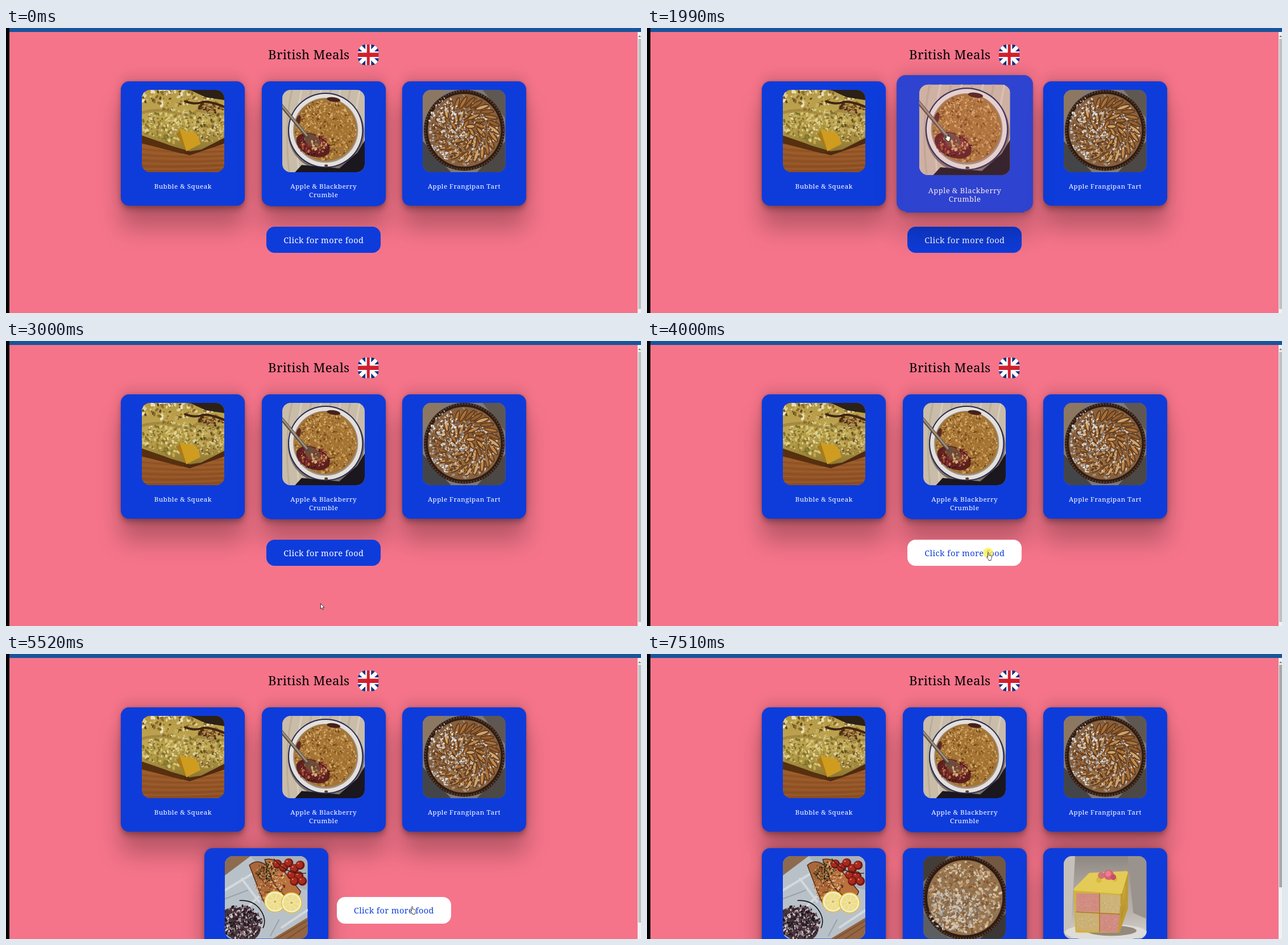
Write an HTML page that moves like this. It is 1117 px wide and 502 px high and loops after 8000 ms.

```html
<!DOCTYPE html>
<html lang="en">
<head>
<meta charset="utf-8">
<title>British Meals</title>
<style>
  html, body { margin: 0; width: 100%; height: 100%; overflow: hidden; }
  #stage {
    position: absolute; left: 0; top: 0; width: 1117px; height: 502px; overflow: hidden;
    background: #f5748a; font-family: "Noto Serif", serif;
  }
  #stage div, #stage svg { position: absolute; }
  #topbar { left: 0; top: 0; width: 1117px; height: 7px; background: #17559b; z-index: 3; }
  #edge { left: 0; top: 0; width: 6px; height: 502px; background: #000; z-index: 3; }
  #scroll { left: 1111px; top: 7px; width: 6px; height: 495px; background: #f1f1f1; z-index: 3; }
  #thumb { left: 1px; top: 12px; width: 5px; }
  #scroll svg { left: 1px; top: 5px; }
  #heading { left: 461px; top: 32px; font-size: 22.3px; line-height: 30px; letter-spacing: .3px; white-space: pre; color: #000; }
  #flag { left: 619px; top: 29px; width: 36.5px; height: 36.5px; border-radius: 14.5px; }
  .card {
    top: 94.4px; width: 218.2px; height: 218.2px; border-radius: 14.5px; background: #0e3cdb;
    box-shadow: rgba(0,0,0,.25) 0 39px 40px, rgba(0,0,0,.12) 0 -8.7px 22px,
      rgba(0,0,0,.12) 0 3px 4.4px, rgba(0,0,0,.17) 0 8.7px 9.5px, rgba(0,0,0,.09) 0 -2px 3.6px;
  }
  .card.low { top: 341.7px; }
  .card.hover { transform: scale(1.1); opacity: .86; z-index: 1; }
  .card svg { left: 36.4px; top: 14.5px; width: 145.4px; height: 145.4px; border-radius: 14.5px; }
  .name {
    left: 14.5px; top: 178px; width: 189.2px; text-align: center; color: #fff; background: #0e3cdb;
    font-size: 11.6px; line-height: 14.2px; letter-spacing: .5px; white-space: pre; padding-bottom: 13.5px;
  }
  #button {
    width: 201px; height: 46.5px; border-radius: 14.5px; text-align: center; white-space: pre;
    font-size: 14.5px; line-height: 46.5px; letter-spacing: .42px;
  }
  #click { width: 18px; height: 18px; border-radius: 50%; background: rgba(255,240,60,.72); z-index: 2; }
  .cursor { z-index: 2; overflow: visible; }
</style>
</head>
<body>
<div id="stage">
  <div id="heading">British Meals</div>
  <svg id="flag" viewBox="0 0 36 36">
    <path d="M0 0h36v36H0z" fill="#13307f"/>
    <path d="M-2-2 38 38M38-2-2 38" stroke="#fff" stroke-width="6.6"/>
    <path d="M0 18h36" stroke="#fff" stroke-width="12"/>
    <path d="M18 0v36" stroke="#fff" stroke-width="10"/>
    <path d="M0 18h36" stroke="#d0202e" stroke-width="7.4"/>
    <path d="M18 0v36" stroke="#d0202e" stroke-width="5"/>
  </svg>
  <div id="button">Click for more food</div>
  <div id="click"></div>
  <svg id="arrow" class="cursor" width="8" height="12">
    <path d="M.4.4v9.4l2.1-1.9 1.5 3.4 1.6-.7-1.5-3.3h2.8z" fill="#fff" stroke="#111" stroke-width=".8"/>
  </svg>
  <svg id="hand" class="cursor" width="10" height="15">
    <path d="M2.6 9V1.6q0-1.1.9-1.1t.9 1.1v3.7l3.9.9q1.3.4 1.2 1.8l-.6 3.6-.8 1.2v1.7H4v-1.4L1.1 10Q.2 8.5.8 8.1t1.8.9z"
      fill="#fff" stroke="#222" stroke-width=".8"/>
  </svg>
  <div id="topbar"></div>
  <div id="edge"></div>
  <div id="scroll">
    <div id="thumb"></div>
    <svg width="5" height="4"><path d="M0 4 2.5 1 5 4z" fill="#777"/></svg>
  </div>
</div>
<script>
const $ = id => document.getElementById(id);
const stage = $('stage');

let seed = 7;
const rnd = () => (seed = (seed * 16807) % 2147483647) / 2147483647;
const pick = list => list[Math.floor(rnd() * list.length)];
const poly = (points, fill, extra = '') => `<polygon points="${points}" fill="${fill}" ${extra}/>`;
const disc = (x, y, r, fill, extra = '') => `<circle cx="${x}" cy="${y}" r="${r}" fill="${fill}" ${extra}/>`;
const oval = (x, y, rx, ry, turn, fill, extra = '') =>
  `<ellipse rx="${rx}" ry="${ry}" transform="translate(${x} ${y}) rotate(${turn})" fill="${fill}" ${extra}/>`;
const line = (d, color, width) =>
  `<path d="${d}" fill="none" stroke="${color}" stroke-width="${width}" stroke-linecap="round"/>`;
const base = fill => `<rect width="145" height="145" fill="${fill}"/>`;
const shade = (id, stops, dir = 'x2="0" y2="1"') => `<defs><linearGradient id="${id}" ${dir}>` +
  stops.map((c, i) => `<stop offset="${i / (stops.length - 1)}" stop-color="${c}"/>`).join('') + '</linearGradient></defs>';
const many = (n, make) => Array.from({ length: n }, (_, i) => make(i)).join('');

// Random flecks spread evenly inside an ellipse.
const scatter = (n, cx, cy, rx, ry, size, colors) => many(n, () => {
  const a = rnd() * 2 * Math.PI, d = Math.sqrt(rnd()), s = size * (.5 + rnd());
  return oval((cx + Math.cos(a) * d * rx).toFixed(1), (cy + Math.sin(a) * d * ry).toFixed(1),
    s.toFixed(1), (s * .6).toFixed(1), Math.round(rnd() * 180), pick(colors));
});

const crust = (x, y, r) => disc(x, y, r, '#2e1d15') +
  disc(x, y, r - 2, 'none', 'stroke="#6b442c" stroke-width="3" stroke-dasharray="2 3"');

function squeak() {
  return shade('wood', ['#6d3a18', '#a2622f', '#8d4f24']) + shade('slab', ['#b59a45', '#c0a654', '#8d762f']) +
    base('url(#wood)') +
    many(14, i => line(`M0 ${84 + i * 5}Q70 ${96 + i * 4} 145 ${92 + i * 4}`, i % 2 ? '#a4652f' : '#84491f', 1)) +
    poly('0,78 0,92 84,115 145,94 145,80', '#4f2a12') +
    poly('0,0 145,0 145,84 104,105 84,108 50,98 0,82', 'url(#slab)') +
    scatter(130, 62, 12, 72, 16, 3, ['#ddd09a', '#8a6b2e', '#c6ae5c', '#5f4a1d', '#eadfb6']) +
    scatter(300, 56, 62, 56, 30, 2.6, ['#d6c678', '#ac983f', '#e0d59c', '#7c7530', '#c3aa4c', '#90772f']) +
    scatter(160, 118, 65, 27, 27, 2.4, ['#c9b364', '#8d6a2c', '#d6c686', '#5f5426', '#a58a3c']) +
    poly('84,0 145,0 145,18 112,13', '#2c2117') +
    scatter(70, 122, 30, 24, 9, 3, ['#6b421c', '#4a2c13', '#946a32', '#b89858']) +
    line('M0 40Q30 32 58 40T98 36Q126 44 145 42', '#6f542150', 5) +
    line('M76 20Q92 26 104 22T145 30', '#3f2611', 4) +
    poly('66,69 96,76 103,95 78,108', '#cf9c20') + poly('66,69 78,108 62,80', '#a87a18') +
    poly('0,80 40,94 76,108 70,112 0,94', '#57300f');
}

function crumble() {
  return base('#c9bca8') +
    many(9, i => line(`M${i * 17} 0Q${i * 17 - 14} 60 ${i * 17 - 5} 145`, i % 2 ? '#bbae99' : '#d6ccbb', 3)) +
    poly('145,88 145,145 22,145 34,132 100,138 132,110', '#1a171f') +
    disc(77, 75, 67, 'rgba(30,22,20,.45)') + disc(76, 71, 66, '#262a58') + disc(76, 71, 64, '#e4e0d9') +
    disc(76, 71, 57, '#9c8f84') + disc(76, 70, 55, '#a47434') +
    scatter(650, 76, 70, 53, 53, 1.7, ['#c8964f', '#8f5f29', '#dcb576', '#744819', '#b98442', '#cda262']) +
    oval(90, 17, 12, 4, 8, '#45201c') + oval(28, 54, 4, 10, 15, '#5d2822') +
    oval(54, 97, 31, 19, 24, '#5b1f20') +
    scatter(130, 54, 97, 29, 17, 2.2, ['#812a29', '#3c1213', '#9d4236', '#b07848', '#692022']) +
    oval(54, 90, 17, 10, 38, '#6d4c39') + scatter(50, 64, 96, 14, 10, 2.2, ['#c99a62', '#a56c3c', '#7d2f2a', '#d8b183']) +
    line('M-2 27 44 82', '#574d43', 6) + line('M-2 26 43 80', '#9c907f', 3) +
    oval(77, 133, 3, 2, 0, '#5e3a24');
}

function apple() {
  const ring = (n, r, length, shift) => many(n, i => {
    const a = i / n * 360 + shift, p = a * Math.PI / 180;
    return oval((77 + Math.cos(p) * r).toFixed(1), (70 + Math.sin(p) * r).toFixed(1), length, 3.2, a + 38,
      pick(['#c28a4c', '#d3a468', '#ad7138', '#95602f']), 'stroke="#5e3819" stroke-width="1.6"');
  });
  return base('#7d7975') + poly('0,0 40,0 0,50', '#8c7862') + poly('0,90 50,145 0,145', '#434549') +
    poly('145,90 145,145 95,145', '#4b4846') + poly('105,0 145,0 145,50', '#5f5852') +
    crust(73, 71, 71) + disc(73, 71, 64, '#87603d') +
    scatter(280, 73, 71, 61, 61, 2.3, ['#bdb7b4', '#8a6240', '#a3917f', '#68452a', '#d0cbc8']) +
    ring(26, 48, 12, 0) + ring(15, 26, 11, 10) + ring(6, 9, 8, 20) +
    scatter(230, 42, 68, 32, 54, 1.9, ['#d4d3d4', '#b5b2b3', '#e4e2e0', '#8b745f']) +
    scatter(170, 82, 84, 46, 44, 1.6, ['#d0cfd0', '#b9aca0', '#6d4a2c']) +
    scatter(40, 64, 106, 30, 14, 3, ['#7a4e29', '#5c3a1f', '#a1713f']);
}

function fish() {
  const fillet = (d, fill) => `<path d="${d}" fill="${fill}" stroke="#4d2b17" stroke-width="1.5"/>`;
  const lemon = (x, y, r) => disc(x, y, r, '#e3bd33') + disc(x, y, r - 1.5, '#f5f0cc') + disc(x, y, r - 4, '#eddd8c') +
    many(8, i => {
      const a = i * Math.PI / 4 + .2;
      return line(`M${x} ${y}l${(Math.cos(a) * (r - 4)).toFixed(1)} ${(Math.sin(a) * (r - 4)).toFixed(1)}`, '#f7efc4', .8);
    }) + disc(x, y, 2, '#c8ae58');
  return base('#b9c1c8') + poly('0,0 45,0 0,34', '#8c6b50') + poly('145,108 145,145 84,145', '#946541') +
    poly('45,0 145,0 145,60 80,40', '#a9b1b8') +
    line('M0 60 50 30M20 110 70 60M100 125 145 95M30 40 60 80', '#d3d9dd', 4) + line('M0 75 40 60M95 112 80 140', '#98a1a9', 2) +
    line('M110 145 145 122M92 145 145 113', '#7d5030', 2) +
    fillet('M43 16Q55 5 70 14L96 50 98 72 86 98Q72 92 62 66Z', '#a9673a') +
    fillet('M70 6Q90 2 100 22L133 62Q130 76 112 74Q92 62 82 40Z', '#b9723e') +
    scatter(240, 79, 48, 27, 38, 1.8, ['#d9a069', '#8b4c25', '#c78450', '#e2bf98', '#5d351c', '#b06c3a']) +
    scatter(100, 74, 27, 20, 18, 1.5, ['#263019', '#44502a', '#191d14', '#6b4526']) +
    [[92, 14], [103, 20], [112, 12], [122, 22], [132, 16], [117, 33], [130, 35], [136, 44], [122, 44]]
      .map(([x, y]) => disc(x, y, 8, '#6f1813') + disc(x - 1, y - 1, 6, '#a92a1e') + disc(x - 3, y - 3, 1.3, '#e58067')).join('') +
    line('M86 5Q110 34 142 30', '#2f2018', 1.4) +
    oval(26, 120, 38, 28, 25, '#45353b') +
    scatter(380, 28, 116, 38, 29, 2, ['#241a20', '#59394c', '#d0c6c9', '#17131a', '#86656f', '#3a1b29', '#a39a9d']) +
    line('M26 78Q50 77 62 94T67 126', '#191519', 1.6) +
    lemon(88, 80, 19) + lemon(117, 82, 18.5);
}

function almond() {
  return base('#6c6a68') + poly('0,0 45,0 0,45', '#433d39') + poly('145,0 145,45 100,0', '#735842') +
    poly('0,100 45,145 0,145', '#5c5f62') + poly('145,100 145,145 100,145', '#3a3736') +
    crust(73, 73, 74) + disc(73, 73, 66, '#94704a') +
    scatter(900, 73, 73, 63, 63, 2.7, ['#c9ad88', '#a98156', '#bca587', '#7f5a38', '#d8c6aa', '#977048', '#8c7a68']) +
    scatter(260, 54, 94, 46, 38, 2.2, ['#c5c0ba', '#a9a29b', '#d3c6b5', '#7e6a57']);
}

function cake() {
  const crumbs = (x, y, colors) => scatter(90, x, y, 18, 14, 1, colors);
  const pink = ['#dc9a90', '#c58078', '#d59288'], cream = ['#d9c38d', '#c4a96f', '#cfb67c'];
  const round = color => `stroke="${color}" stroke-width="5" stroke-linejoin="round"`;
  return shade('wall', ['#8f8882', '#aaa39d', '#b9b2ab', '#d6d2cd']) +
    shade('side', ['#d9b739', '#c09c30', '#a8842b']) + base('url(#wall)') +
    poly('0,0 20,0 12,145 0,145', '#c6c0ba') + poly('112,0 145,0 145,110 122,100', '#9a938d') +
    oval(74, 134, 72, 15, 0, '#dedcd8') + oval(84, 131, 44, 9, 0, '#94897f') +
    poly('20,60 46,32 110,29 110,92 96,132 23,132', '#d2b23b', round('#d2b23b')) +
    poly('101,66 111,30 110,92 96,132', 'url(#side)', round('#be9b32')) +
    poly('20,58 46,32 110,29 100,64', '#e4cb57', round('#e4cb57')) +
    poly('22,65 63,66 62,98 22,97', '#d18c82') + poly('64,66 100,69 98,101 64,99', '#ccb379') +
    poly('22,99 62,100 62,132 23,130', '#cbb076') + poly('64,101 98,103 95,134 64,133', '#d18c82') +
    crumbs(42, 81, pink) + crumbs(82, 84, cream) + crumbs(42, 115, cream) + crumbs(80, 118, pink) +
    line('M22 98 98 102M63 66V133', '#a97436', 1.5) +
    disc(62, 42, 5, '#dcb93a') + disc(90, 41, 4, '#dcb93a') +
    disc(66, 34, 6, '#cf727b') + disc(79, 33, 9, '#d76376') + disc(78, 31, 5, '#e88092') + disc(87, 37, 5, '#c55068');
}

const meals = [
  [squeak, 'Bubble & Squeak'], [crumble, 'Apple & Blackberry\nCrumble'], [apple, 'Apple Frangipan Tart'],
  [fish], [almond], [cake]
];
const cards = meals.map(([photo, name], i) => {
  const el = document.createElement('div');
  el.className = i < 3 ? 'card' : 'card low';
  el.innerHTML = `<svg viewBox="0 0 145 145">${photo()}</svg>`;
  if (name) {
    const label = document.createElement('div');
    label.className = 'name';
    label.textContent = name;
    el.append(label);
  }
  stage.insertBefore(el, $('button'));
  return el;
});

const CENTER = 558.75, CELL = 247.3, GAP = 14.5, BUTTON = 201;

// start ms, pointer, x, y, cards shown, hovered card, button highlight, click mark
const steps = [
  [0, '', 0, 0, 3],
  [500, 'arrow', 1070, 494, 3],
  [990, 'arrow', 1029, 260, 3],
  [1490, 'hand', 790, 215, 3, 2],
  [1990, 'hand', 524, 184.5, 3, 1],
  [2490, 'hand', 330, 240, 3, 0],
  [3000, 'arrow', 553, 461.5, 3],
  [3500, 'hand', 578, 377, 3, -1, .8],
  [4000, 'hand', 596.5, 372, 3, -1, 1, true],
  [4500, 'arrow', 600, 373, 4],
  [5020, 'hand', 692, 447, 4, -1, .8],
  [5520, 'hand', 711, 444, 4, -1, 1],
  [6020, 'hand', 711, 444, 5, -1, 1],
  [6520, 'hand', 810, 452.5, 5, -1, 1],
  [7020, 'hand', 810, 452.5, 6, 5],
  [7510, '', 0, 0, 6]
];

const mix = (a, b, k) => `rgb(${a.map((v, i) => Math.round(v + (b[i] - v) * k))})`;
const place = (el, x, y) => { el.style.left = x + 'px'; el.style.top = y + 'px'; };
const show = (el, on) => { el.style.display = on ? 'block' : 'none'; };

function draw([, pointer, x, y, count, hovered = -1, lit = 0, clicked = false]) {
  const extra = count - 3, full = extra === 3;
  const rowLeft = CENTER - (extra * CELL + (full ? 0 : BUTTON)) / 2;
  cards.forEach((el, i) => {
    const left = i < 3 ? CENTER - 1.5 * CELL : rowLeft;
    el.style.left = left + GAP + (i % 3) * CELL + 'px';
    show(el, i < count);
    el.classList.toggle('hover', i === hovered);
  });

  const button = $('button'), blue = [14, 60, 219], white = [255, 255, 255];
  show(button, !full);
  place(button, rowLeft + extra * CELL, extra ? 428.2 : 349.5);
  button.style.background = mix(blue, white, lit);
  button.style.color = mix(white, blue, lit);

  for (const id of ['arrow', 'hand']) {
    show($(id), pointer === id);
    place($(id), x, y);
  }
  show($('click'), clicked);
  place($('click'), x - 5.5, y - 8);

  const end = full ? 411 : extra ? 473 : 495;
  $('thumb').style.height = end - 19 + 'px';
  $('thumb').style.background = full && !pointer ? '#a8a8a8' : '#c1c1c1';
}

let current;
function tick() {
  const t = performance.now() % 8000;
  const step = steps.findLast(s => s[0] <= t);
  if (step !== current) draw(current = step);
  requestAnimationFrame(tick);
}
tick();
</script>
</body>
</html>
```
